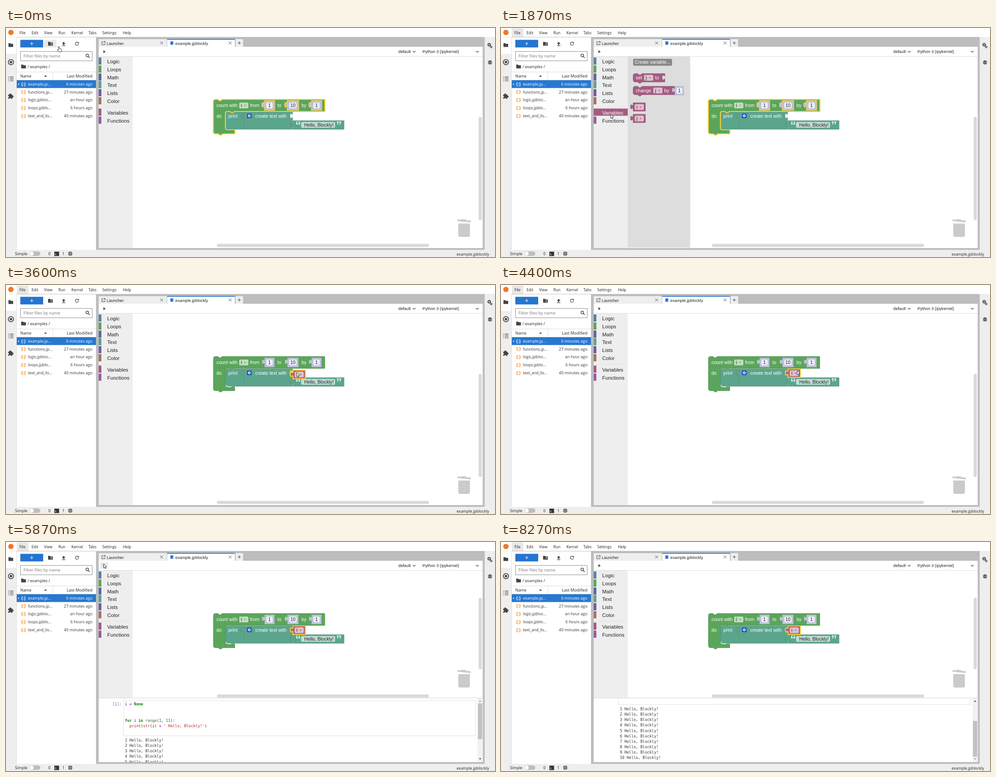
An HTML page that plays this animation: 1092x513 px, repeating every 8990 ms.

```html
<!DOCTYPE html>
<html lang="en">
<head>
<meta charset="utf-8">
<title>Block editor notebook</title>
<style>
html, body { margin: 0; width: 100%; height: 100%; overflow: hidden; background: #fff; }
svg { display: block; }
text { white-space: pre; }
.ui { font-family: "Open Sans", "Noto Sans", sans-serif; }
.sans { font-family: "Liberation Sans", Arial, sans-serif; }
.mono { font-family: "DejaVu Sans Mono", monospace; }
</style>
</head>
<body>
<svg id="stage" width="100%" height="100%" viewBox="0 0 1092 513"></svg>
<script>
const LOOP = 8990, STEP = 200 / 3;
const GREEN = '#5ba55b', TEAL = '#5ba58c', PLUM = '#a55b80', PALE = '#bdc2db', YELLOW = '#fc3';
const stage = document.getElementById('stage');

const rect = (x, y, w, h, fill, extra = '') =>
  `<rect x="${x}" y="${y}" width="${w}" height="${h}" fill="${fill}" ${extra}/>`;
const path = (d, fill = 'none', stroke = 'none', width = 1) =>
  `<path d="${d}" fill="${fill}" stroke="${stroke}" stroke-width="${width}"/>`;
const circle = (x, y, r, fill, extra = '') => `<circle cx="${x}" cy="${y}" r="${r}" fill="${fill}" ${extra}/>`;
const text = (x, y, s, kind, size, fill = '#222', extra = '') =>
  `<text x="${x}" y="${y}" class="${kind}" font-size="${size}" fill="${fill}" ${extra}>${s}</text>`;
const ui = (x, y, s, fill, extra, size = 8.8) => text(x, y, s, 'ui', size, fill, extra);
const label = (x, y, s, fill = '#fff') => text(x, y, s, 'sans', 10.45, fill);
const mono = (x, y, s, fill = '#333', extra = '') => text(x, y, s, 'mono', 8.45, fill, extra);
const line = (d, color = '#444', width = 1.2) => path(d, 'none', color, width);
const times = (n, f) => Array.from({ length: n }, (_, i) => f(i)).join('');

// ---- page chrome ----
const folder = (x, y) => path(`M${x} ${y}h4l1.5 1.5h5v7h-10.5z`, '#444');
const cross = (x, y) => line(`M${x - 3} ${y - 3}l6 6m0-6l-6 6`, '#444', 1);
const chevron = (x, y) => line(`M${x - 3} ${y - 1.5}l3 3 3-3`, '#444', 1.1);
const cog = (x, y, r, color) =>
  circle(x, y, r, 'none', `stroke="${color}" stroke-width="${r * .7}"`) +
  circle(x, y, r * 1.5, 'none', `stroke="${color}" stroke-width="${r * .5}" stroke-dasharray="${r * .589}"`);

const files = [['example.jp...', '6 minutes ago'], ['functions.jp...', '27 minutes ago'],
  ['logic.jpbloc...', 'an hour ago'], ['loops.jpblo...', '6 hours ago'], ['text_and_lis...', '40 minutes ago']];
const menus = [['File', 30], ['Edit', 57], ['View', 85], ['Run', 117], ['Kernel', 146],
  ['Tabs', 184], ['Settings', 215], ['Help', 261]];

function sideBars() {
  return rect(0, 20, 24, 493, '#eee') + rect(0, 21, 23, 37, '#fff') + folder(5.5, 34) +
    circle(11, 76.5, 5.8, 'none', 'stroke="#444" stroke-width="1.8"') + rect(8.5, 74, 5, 5, '#444') +
    times(3, i => line(`M5 ${110 + i * 4.2}h1.6m2 0h8`, '#444', 1.4)) +
    rect(5, 149, 9.5, 9.5, '#444', 'rx="1"') + circle(9.5, 148.5, 1.9, '#444') +
    circle(15, 153.5, 1.9, '#444') + circle(5.2, 154, 1.6, '#eee') + circle(9.5, 158.3, 1.6, '#eee') +
    rect(1069, 20, 23, 477, '#eee') + cog(1079, 37.5, 2.4, '#444') + cog(1083.5, 42.5, 1.7, '#444') +
    rect(1077.8, 72.5, 6, 9, '#444', 'rx="3"') + line('M1076 74.5h9.6M1076 77.3h9.6M1076 80h9.6', '#444', 1) +
    line('M1079 76h3.6m-3.6 2.6h3.6', '#eee', .9);
}

function fileBrowser(hover) {
  let s = rect(23, 21, 178, 476, '#fff') + line('M23.5 21V497', '#ddd', 1);
  if (hover) s += rect(85, 26.5, 28, 17, '#e9e9e9');
  s += rect(32, 26.5, 51, 17, '#2575d0') + line('M54 35h7m-3.5-3.5v7', '#fff', 1) +
    folder(94, 31) + line('M101 34.2v3.6m-1.8-1.8h3.6', '#eee', .9) +
    path('M125 35h2.3v3h3v-3h2.3l-3.8-4zM125 39h7.6v1.2h-7.6z', '#444') +
    line('M161.5 33.2a3.6 3.6 0 1 0 .4 3', '#444', 1.2) + path('M162.8 31v3.6h-3.6z', '#444') +
    rect(32.5, 52.5, 160, 21, '#fff', 'stroke="#8c8c8c"') + ui(39, 66.2, 'Filter files by name', '#777', '', 9.4) +
    circle(181.5, 61.5, 3, 'none', 'stroke="#444" stroke-width="1.3"') + line('M183.7 63.7l3.3 3.3', '#444', 1.5) +
    folder(34, 82) + ui(48, 89.5, '/ examples /') +
    line('M24 98.5h177M24 116.5h177M104.5 98v18', '#ddd', 1) +
    ui(32, 111, 'Name', '#222', 'font-weight="500"') + path('M85 109l3.2-3.3 3.2 3.3z', '#444') +
    ui(193, 111, 'Last Modified', '#222', 'text-anchor="end" font-weight="500"', 9.1) +
    rect(24, 117, 177, 17.5, '#2878d1') + circle(28, 126, 1.2, '#fff');
  return s + files.map(([name, age], i) => {
    const y = 129 + i * 17.7, color = i ? '#333' : '#fff';
    return text(34, y - .3, '{:}', 'sans', 9, i ? '#f57c00' : '#fff', 'font-weight="bold"') +
      ui(49, y, name, color, '', 8.7) + ui(193, y, age, color, 'text-anchor="end"', 8.9);
  }).join('');
}

function chrome(t) {
  const clicked = t > 1795, running = t > 5525 && t < 6860;
  return rect(0, 0, 1092, 513, '#fff') +
    (clicked ? rect(24, 1, 26, 19, '#e8e8e8') : '') + circle(11, 10, 6, '#f37726') +
    menus.map(([name, x]) => ui(x, 14, name, '#222', '', 8.6)).join('') +
    rect(201, 21, 868, 476, '#bdbdbd') + line('M0 20.5H1092', '#c4c4c4', 1) +
    sideBars() + fileBrowser(t < 60) +
    rect(207, 25, 152, 17, '#eee') + rect(360, 25, 151, 18, '#fff') + rect(360, 24.5, 151, 1.8, '#2575d0') +
    rect(513, 25, 16.5, 17, '#eee') + line('M517.5 33.5h7m-3.5-3.5v7', '#444', 1) +
    line('M217 30.5h-3v7h7v-3M218.5 30h3v3m0-3l-4.5 4.5', '#444', 1) +
    text(225, 37.5, 'Launcher', 'sans', 9.1) + cross(347.5, 33.5) +
    rect(367, 30, 6.5, 7.5, '#3574d6') + text(378, 37.5, 'example.jpblockly', 'sans', 9.25) + cross(500.5, 33.5) +
    rect(207, 42, 857.5, 451, '#fff') + line('M207 63.5h858', '#ddd', 1) +
    (running ? rect(211, 45.5, 17, 14.5, '#e8e8e8') : '') + path('M217.5 49.8v6.4l5-3.2z', '#444') +
    text(876, 56, 'default', 'sans', 9.25) + chevron(911.5, 53) +
    text(930, 56, 'Python 3 (ipykernel)', 'sans', 9.2) + chevron(1052.5, 53) +
    rect(0, 497, 1092, 16, '#eee') + ui(20, 508.5, 'Simple') +
    rect(52.5, 500.5, 24, 10, '#bdbdbd', 'rx="5"') + circle(57.5, 505.5, 4.4, '#fff') +
    ui(94.5, 509, '0') + rect(108, 501, 10.5, 10, '#333') + mono(109, 508.5, '$_', '#fff', 'style="font-size:6px"') +
    ui(125.5, 509, '1') + rect(140.5, 502.5, 6, 6, 'none', 'stroke="#333" stroke-width="1.3"') +
    rect(142.5, 504.5, 2, 2, '#333') + line('M142 500.5v10m3-10v10M138.5 504h10m-10 3h10', '#333', .7) +
    rect(141.2, 503.2, 4.6, 4.6, '#eee') + rect(142.2, 504.2, 2.6, 2.6, '#333') +
    ui(1079, 509.5, 'example.jpblockly', '#222', 'text-anchor="end"', 8.74);
}

// ---- blocks ----
const NOTCH = 'l4 3h2l4-3', NOTCH_BACK = 'l-4 3h-2l-4-3';
const TAB = 'c0 7.2-5.8-5.8-5.8 5.4s5.8-1.8 5.8 5.4';
const valuePath = (x, y, w, h) => `M${x} ${y}v3.6${TAB}V${y + h}h${w}V${y}Z`;
const stackPath = (x, y, w, h) =>
  `M${x} ${y + 5}q0-5 5-5h5${NOTCH}H${x + w}v${h}H${x + 20}${NOTCH_BACK}h-5q-5 0-5-5Z`;
const field = (x, y, w, opacity = .62) => rect(x, y, w, 13, '#fff', `rx="2.8" fill-opacity="${opacity}"`);
const dropdown = (x, y, name, color) => field(x, y, 20.5) + label(x + 4, y + 10, name, '#222') +
  path(`M${x + 11} ${y + 5.5}h4.4l-2.2 2.8z`, color);
const number = (x, y, w, n) => path(valuePath(x, y, w, 21), PALE) + field(x + 4, y + 4, w - 8, .75) +
  label(x + w / 2 - 2.9 * n.length, y + 14.3, n, '#222');

function variable(x, y, name, selected) {
  const d = valuePath(x, y, 27.5, 18.8);
  return path(d, PLUM, selected ? YELLOW : '#84496a', selected ? 2.2 : .6) + dropdown(x + 3.5, y + 3, name, PLUM);
}

const LOOP_PATH = `M463 165q0-5 5-5h5${NOTCH}H712V187H510${NOTCH_BACK}h-6q-4 0-4 4V224q0 4 4 4H511V237H484${NOTCH_BACK}H468q-5 0-5-5Z`;
const counts = [[577.5, 22, '1'], [628.5, 24.5, '10'], [682.5, 22, '1']];

function program(selected) {
  const sockets = counts.map(([x, w]) => valuePath(x, 163, w, 21)).join('');
  return path(LOOP_PATH, GREEN, '#498449', .6) + label(470, 177, 'count with') + dropdown(520.7, 167, 'i', GREEN) +
    label(545, 177, 'from') + label(606, 177, 'to') + label(660, 177, 'by') + label(470, 200.5, 'do') +
    (selected ? line(sockets, YELLOW, 2.6) : '') +
    counts.map(([x, w, n]) => number(x, 163, w, n)).join('') +
    path(`M490 192q0-4 4-4h6${NOTCH}H530.5V227H494q-4 0-4-4Z`, TEAL, '#498470', .6) + label(496.5, 200.5, 'print') +
    path(valuePath(531, 188, 109, 39), TEAL, '#498470', .6) +
    rect(538, 191.5, 10.5, 10.5, '#2146c7', 'rx="2"') + cog(543.2, 196.8, 2, '#fff') +
    label(556.5, 200.5, 'create text with') + path(`M640.5 191.6${TAB}Z`, '#fff') +
    path(valuePath(641, 207.5, 114, 19.5), TEAL, '#498470', .6) + field(659, 210.5, 76) +
    label(666, 220.5, 'Hello, Blockly!', '#222') +
    text(646, 226.5, '“', 'sans', 26, '#d5ebe3', 'font-weight="bold"') +
    text(737, 226.5, '”', 'sans', 26, '#d5ebe3', 'font-weight="bold"') +
    (selected ? line(LOOP_PATH, YELLOW, 2.2) : line('M491 224q1 4 5 4h7', '#fff', 1.3));
}

const categories = [['Logic', 75, '#5b80a5'], ['Loops', 93, GREEN], ['Math', 111, '#5b67a5'], ['Text', 128, TEAL],
  ['Lists', 146, '#745ba5'], ['Color', 164, '#a5745b'], ['Variables', 189.5, PLUM], ['Functions', 207.5, '#995ba5']];

function toolbox(open, bottom) {
  return rect(207, 64, 76, bottom - 64, '#eee') + line('M213 177.5h66', '#e2e2e2', 1) +
    categories.map(([name, y, color]) => {
      const on = open && name === 'Variables';
      return rect(207, y - 9, on ? 76 : 6, 16, color) + text(226, y + 4, name, 'sans', 11.5, on ? '#fff' : '#222');
    }).join('');
}

function flyout() {
  return rect(283, 64, 139.5, 428, '#ddd') + rect(295, 69, 87, 15.5, '#888', 'rx="3"') + label(298.5, 80.3, 'Create variable...') +
    path(stackPath(295, 102, 71, 19), PLUM, '#84496a', .6) + path(`M366.3 105.6${TAB}Z`, '#ddd') +
    label(301, 115, 'set') + dropdown(319.5, 105, 'j', PLUM) + label(344, 115, 'to') +
    path(stackPath(295, 130.5, 93, 19), PLUM, '#84496a', .6) +
    label(301, 143.5, 'change') + dropdown(340, 133.5, 'j', PLUM) + label(364.5, 143.5, 'by') +
    number(388, 130, 21, '1') + variable(295, 167.5, 'i') + variable(295, 193.2, 'j');
}

function workspaceTools(split) {
  const y = split ? -142 : 0;
  return rect(1055.5, split ? 125 : 199, 7, split ? 160 : 231, '#d9d9d9', 'rx="3.5"') +
    rect(471, 483.5 + y, 473.5, 7, '#d9d9d9', 'rx="3.5"') +
    path(`M1010 ${438 + y}h26v26q0 4-4 4h-18q-4 0-4-4z`, '#cbcbcb') +
    path(`M1008 ${429 + y}l9 .6 .5-1.5 10 1 .2 1.5 10.3 1v4l-30-3z`, '#cbcbcb');
}

// ---- output panel ----
const span = (s, color, bold) => `<tspan fill="${color}"${bold ? ' font-weight="bold"' : ''}>${s}</tspan>`;
const keyword = s => span(s, '#008000', true), red = s => span(s, '#ba2121'), plus = s => span(s, '#a2f', true);

function panel(t) {
  const scroll = t < 7460 ? 0 : Math.min(70, 8 + (t - 7466) * .31), LINE = 12.15;
  let cell = '';
  if (t > 5660) {
    const row = (n, s) => mono(265.5, 366.3 + n * LINE, s);
    cell = rect(262.5, 355.5, 786.5, 78.5, '#fff', 'stroke="#e0e0e0"') + mono(237.5, 366.3, '[1]:', '#307fc1') +
      row(0, `i ${plus('=')} ${keyword('None')}`) +
      row(3, `${keyword('for')} i ${keyword('in')} ${span('range', '#3a6b3a')}(${span('1', '#080')}, ${span('11', '#080')}):`) +
      row(4, `  ${red('print')}(${red('str')}(i) ${plus('+')} ${red("' Hello, Blockly!'")})`);
  }
  if (t > 5860) cell += times(10, i => mono(265.5, 447 + i * LINE, `${i + 1} Hello, Blockly!`));
  return rect(207, 349, 857.5, 144, '#fff') + line('M207 349.5h858', '#d5d5d5', 1) +
    `<svg x="207" y="350" width="846" height="143" viewBox="207 350 846 143"><g transform="translate(0 ${-scroll})">${cell}</g></svg>` +
    rect(1053, 350, 11.5, 143, '#f1f1f1') + rect(1054, 361.5 + scroll / 1.78, 9.5, 80, '#c1c1c1') +
    path('M1056 358l2.7-3.2 2.7 3.2z', scroll ? '#505050' : '#a3a3a3') +
    path('M1056 484.5l2.7 3.2 2.7-3.2z', scroll < 70 ? '#505050' : '#a3a3a3');
}

// ---- motion ----
const pointer = [[0, 118, 41], [930, 241, 125], [1400, 245, 193], [2000, 245, 193], [2600, 304, 172], [2667, 304, 172],
  [2933, 420, 190, 1], [3600, 649, 196, 1], [3870, 669, 195], [4000, 669, 195], [4130, 667, 193], [4267, 667, 193],
  [4530, 656, 191], [4600, 656, 191], [5400, 231, 50], [5530, 218, 49], [6800, 218, 49], [7330, 380, 432],
  [8000, 380, 432], [8266, 330, 515]];
const dragged = [[2667, 295, 167.5], [2933, 351, 174, 1], [3600, 641, 191, 1]];

// Keys are [time, x, y, linear]; the others ease in and out.
function at(keys, t) {
  const i = keys.findIndex(k => k[0] >= t);
  if (i < 0) return keys[keys.length - 1].slice(1, 3);
  if (!i) return keys[0].slice(1, 3);
  const a = keys[i - 1], b = keys[i];
  let p = (t - a[0]) / (b[0] - a[0]);
  if (!b[3]) p = p * p * (3 - 2 * p);
  return [1, 2].map(n => a[n] + (b[n] - a[n]) * p);
}

function cursor(t) {
  const [x, y] = at(pointer, t);
  let d = 'M0 0V9.3l2.1-1.9 1.5 3.1 1.5-.7-1.4-3H6.4Z';
  if (t < 190) d = 'M-1 1q1-2 2 0v4l4 1q1.5.5 1.2 2l-.8 4.5h-5.4l-3-4q-.5-1.5 1-1l1 .7z';
  if (t > 7200 && t < 8060) return line(`M${x - 2} ${y - 4.5}h1.5l.5.5.5-.5h1.5M${x} ${y - 4}v8.5M${x - 2} ${y + 5}h1.5l.5-.5.5.5h1.5`, '#222', 1);
  return `<g transform="translate(${x} ${y})">${path(d, '#fff', '#222', .9)}</g>`;
}

function scene(t) {
  const open = t > 1795 && t < 2725, split = t > 5595, taken = t > 2725;
  let s = chrome(t) + toolbox(open, split ? 349 : 493) + program(!taken) + workspaceTools(split);
  if (open) s += flyout();
  if (taken) {
    const [x, y] = t > 3660 ? [641, 188] : at(dragged, t);
    if (t > 3520 && t < 3660) s += line(`M640.5 191.6${TAB}`, YELLOW, 2.6);
    s += variable(x, y, 'i', true);
  }
  if (split) s += panel(t);
  return s + cursor(t);
}

let shown = -1;
function tick() {
  const step = Math.floor((performance.now() % LOOP + 4) / STEP);
  if (step !== shown) stage.innerHTML = scene((shown = step) * STEP);
  requestAnimationFrame(tick);
}
tick();
</script>
</body>
</html>
```
